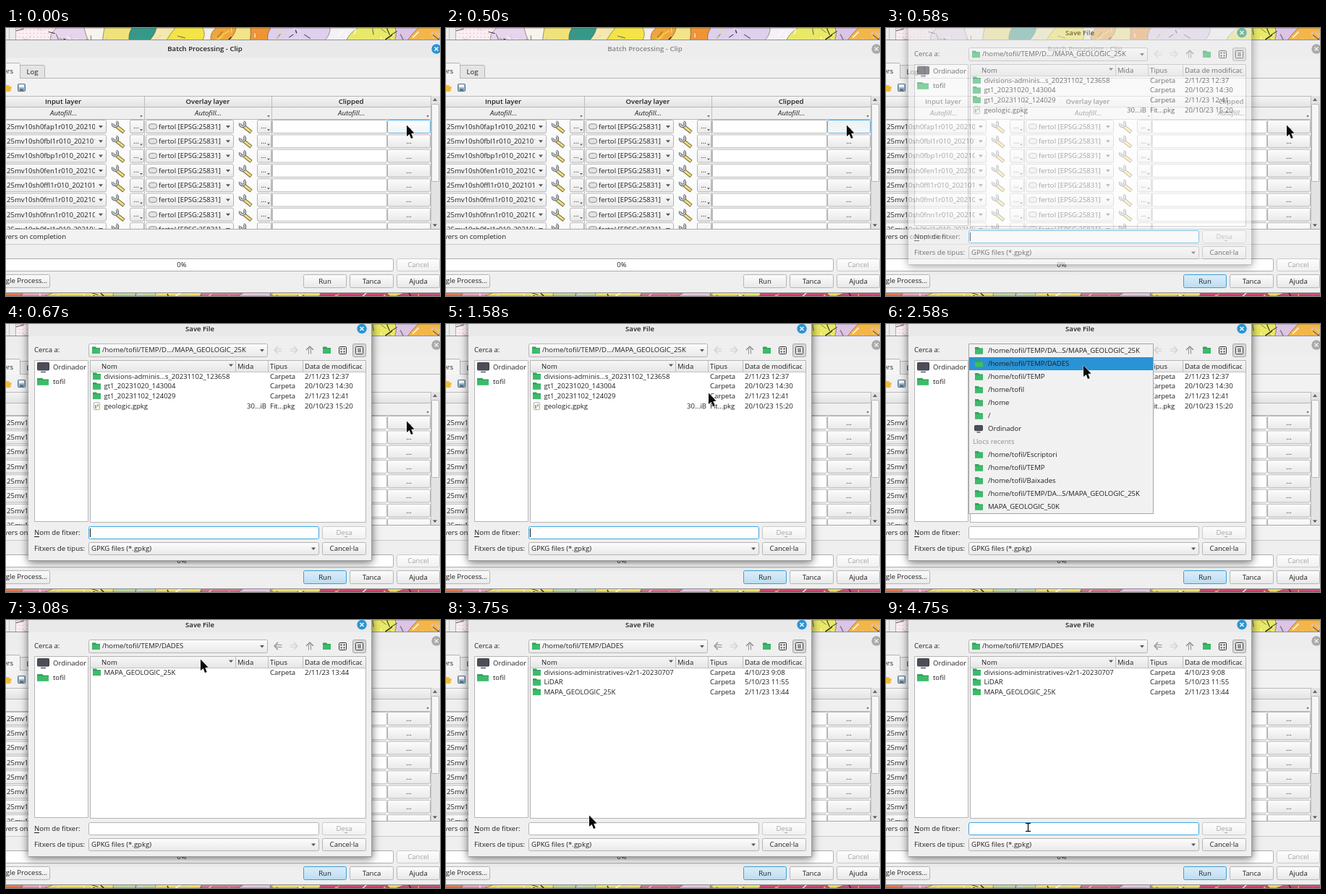
An HTML page with a canvas that plays this animation: 600 px wide and 371 px high, repeating every 5.01 s.

```html
<!DOCTYPE html>
<html lang="ca">
<head>
<meta charset="utf-8">
<title>Batch Processing - Clip</title>
<style>
html, body { margin: 0; width: 100%; height: 100%; overflow: hidden; }
canvas { display: block; }
</style>
</head>
<body>
<canvas id="stage" width="600" height="371"></canvas>
<script>
const LOOP = 5010;
const main = document.getElementById('stage').getContext('2d');
const layerCanvas = document.createElement('canvas');
layerCanvas.width = 600;
layerCanvas.height = 371;
const layer = layerCanvas.getContext('2d');
let g = main;

const INK = '#1f1f1f', BG = '#efefef', EDGE = '#b5b5b5', BLUE = '#2a93d5', GREEN = '#3dbb6b';
const HOME = '/home/tofil';

// ---- helpers ----
function text(s, x, cy, { align = 'left', color = INK, style = '' } = {}) {
  g.font = `${style} 9.55px "Open Sans", "Noto Sans", sans-serif`;
  g.textAlign = align;
  g.fillStyle = color;
  g.fillText(s, x, cy + 3.4);
}
function rect(x, y, w, h, fill) {
  g.fillStyle = fill;
  g.fillRect(x, y, w, h);
}
function box(x, y, w, h, fill, stroke = EDGE, r = 2) {
  g.beginPath();
  g.roundRect(x + .5, y + .5, w - 1, h - 1, r);
  g.fillStyle = fill;
  g.fill();
  g.strokeStyle = stroke;
  g.lineWidth = 1;
  g.stroke();
}
function shade(y, h, top, bottom) {
  const s = g.createLinearGradient(0, y, 0, y + h);
  s.addColorStop(0, top);
  s.addColorStop(1, bottom);
  return s;
}
function poly(points, fill) {
  g.beginPath();
  points.forEach(([x, y]) => g.lineTo(x, y));
  g.closePath();
  g.fillStyle = fill;
  g.fill();
}
function line(points, color, width = 1) {
  g.beginPath();
  points.forEach(([x, y]) => g.lineTo(x, y));
  g.strokeStyle = color;
  g.lineWidth = width;
  g.lineJoin = 'round';
  g.stroke();
}
function clipped(x, y, w, h, draw) {
  g.save();
  g.beginPath();
  g.rect(x, y, w, h);
  g.clip();
  draw();
  g.restore();
}
function triangle(x, y, color = '#555', size = 3) {
  poly([[x - size, y - size / 2], [x + size, y - size / 2], [x, y + size / 2 + .5]], color);
}
function button(x, y, w, h, label, { color = INK, top = '#fdfdfd', bottom = '#e8e8e8', edge = EDGE } = {}) {
  box(x, y, w, h, shade(y, h, top, bottom), edge);
  if (label) text(label, x + w / 2, y + h / 2, { align: 'center', color });
}
function combo(x, y, w, h) {
  button(x, y, w, h);
  triangle(x + w - 8, y + h / 2);
}
function closeDot(x, y, active) {
  g.beginPath();
  g.arc(x, y, 6.7, 0, 7);
  g.fillStyle = active ? BLUE : '#a9a9a9';
  g.fill();
  const c = active ? '#fff' : '#eee';
  line([[x - 2.5, y - 2.5], [x + 2.5, y + 2.5]], c, 1.4);
  line([[x + 2.5, y - 2.5], [x - 2.5, y + 2.5]], c, 1.4);
}
function folder(x, cy, w = 11) {
  poly([[x, cy - 5], [x + w * .45, cy - 5], [x + w * .55, cy - 3.5], [x + w, cy - 3.5], [x + w, cy + 4.5], [x, cy + 4.5]], '#2fa35a');
  rect(x, cy - 2.3, w, 6.8, GREEN);
}
function monitor(x, cy, w) {
  box(x, cy - w * .42, w, w * .68, '#4c4f57', '#3c3f46', 1);
  rect(x + w * .3, cy + w * .32, w * .4, 2, '#777b84');
}

// ---- map behind the windows ----
function map() {
  let seed = 11;
  const rnd = () => (seed = (seed * 16807) % 2147483647) / 2147483647;
  const strip = (y, h, bands, marks) => clipped(0, y, 600, h, () => {
    bands.forEach(([x, color]) => {
      const lean = rnd() * 26 - 16, bulge = rnd() * 16 - 8;
      g.beginPath();
      g.moveTo(600, y);
      g.lineTo(x, y);
      g.quadraticCurveTo(x + lean / 2 + bulge, y + h / 2, x + lean, y + h);
      g.lineTo(600, y + h);
      g.fillStyle = color;
      g.fill();
      g.strokeStyle = 'rgba(60,50,40,.6)';
      g.lineWidth = .8;
      g.stroke();
    });
    const inks = ['#222', '#777', '#fff', '#d9c3e6', '#f4e542'];
    for (let i = 0; i < marks; i++) {
      const x = 15 + rnd() * 585, top = y + rnd() * h;
      line([[x, top], [x + rnd() * 24 - 12, top + 2 + rnd() * 8]], inks[i % 5], .5 + rnd());
    }
  });
  strip(0, 18, [[14, '#fbeef3'], [70, '#e6d5ec'], [108, '#f7f4ee'], [136, '#efe27a'], [174, '#35998a'], [208, '#f3e9b0'],
    [234, '#f4e445'], [272, '#f5efe6'], [290, '#f0a53e'], [318, '#f3e48a'], [338, '#ee9434'], [366, '#ded0ee'],
    [448, '#f4f2f6'], [486, '#e8e968'], [538, '#dcc4e4'], [570, '#f2b64a']], 75);
  strip(365, 6, [[0, '#e8774e'], [28, '#eda0b5'], [66, '#f0e35f'], [150, '#b9d79a'], [205, '#efe06a'], [265, '#d9738c'],
    [330, '#e6c4de'], [375, '#efdf6c'], [430, '#d8436c'], [530, '#ecd75e'], [552, '#d24a70']], 40);
  rect(0, 0, 14, 17, '#ececec');
  line([[4.5, 0], [4.5, 17]], '#c4c4c4');
  line([[13.5, 0], [13.5, 17]], '#b0b0b0');
  for (let x = 18; x < 68; x += 5) for (let y = 2; y < 16; y += 5) rect(x, y, 1, 1, '#e39ab4');
}

// ---- batch window ----
function wrench(x, cy) {
  line([[x + 7, cy], [x + 17, cy + 8]], '#6d6440', 5);
  line([[x + 7, cy], [x + 16.5, cy + 7.5]], '#f0dc7c', 3);
  g.beginPath();
  g.arc(x + 5, cy - 3.5, 3.4, -1.1, 3.4);
  g.strokeStyle = '#5d6266';
  g.lineWidth = 3.6;
  g.stroke();
  g.strokeStyle = '#c9cdd0';
  g.lineWidth = 1.8;
  g.stroke();
}
function moreButton(x, y) {
  button(x, y, 20, 19, '');
  text('…', x + 9, y + 9, { align: 'center' });
  triangle(x + 16, y + 14, '#555', 1.8);
}
function tableRow(code, i, k) {
  const y = 127 + i * 20.3, cy = y + 9.3;
  rect(140, y, 30, 19, '#fbfbfb');
  rect(316, y, 30, 19, '#fbfbfb');
  combo(-5, y, 144, 19);
  clipped(0, y, 123, 20, () => text(`25mv10sh0${code}1r010_20210114`, 1, cy));
  wrench(146, cy);
  moreButton(171, y);
  combo(193, y, 122, 19);
  g.beginPath();
  g.roundRect(197.5, cy - 3.5, 11, 7, 3);
  g.fillStyle = '#e2e2e2';
  g.fill();
  g.strokeStyle = '#8a8a8a';
  g.lineWidth = 1;
  g.stroke();
  text('fertol [EPSG:25831]', 211, cy);
  wrench(322, cy);
  moreButton(347, y);
  box(368, y, 159, 19, '#fff', '#b9b9b9', 1);
  const lit = i === 0 && k < 7;
  const look = !lit ? {} : k < 4
    ? { top: '#ffffff', bottom: '#eef3f6', edge: '#55b5e8' }
    : { top: '#eef2f4', bottom: '#f4f6f7', edge: '#55b5e8' };
  button(527, y, 60, 19, '…', look);
}
function batchWindow(k) {
  const active = k < 6;
  rect(0, 16, 600, 351, '#8f8f8f');
  rect(0, 17, 600, 349, BG);
  rect(0, 17, 600, 24, active ? '#e9e9ea' : '#ededed');
  text('Batch Processing - Clip', 275, 29, { align: 'center', style: '600', color: active ? INK : '#858585' });
  closeDot(595, 29, active);

  box(19, 51, 35, 20, '#e4e4e4');
  text('Log', 28.5, 60.5);
  line([[19, 69.5], [600, 69.5]], EDGE);
  box(-6, 48, 26, 24, '#f5f5f5');
  rect(0, 70, 600, 229, '#f2f2f2');
  text('Parameters', 10, 60, { align: 'right' });
  line([[0, 299.5], [600, 299.5]], '#c9c9c9');

  poly([[0, 79], [4, 79], [5, 81], [8, 81], [6, 88], [0, 88]], '#f0bd3a');
  box(16, 77, 11, 11, '#a3b8c9', '#4f6f88', 1);
  rect(18, 78, 7, 4, '#f1f5f9');
  rect(19, 84, 5, 3, '#5d7c95');

  rect(0, 94, 588, 185, '#fafafa');
  rect(0, 94, 588, 15, shade(94, 15, '#f6f6f6', '#e3e3e3'));
  rect(0, 109, 588, 17, '#efefef');
  [['Input layer', 79, 191], ['Overlay layer', 279, 367], ['Clipped', 477, 587]].forEach(([name, x, edge]) => {
    text(name, x, 102, { align: 'center', style: '600' });
    text('Autofill…', x + .5, 118, { align: 'center', style: 'italic' });
    triangle(edge - 4, 122, '#666', 1.8);
    line([[edge + .5, 94], [edge + .5, 278]], '#bdbdbd');
  });
  [94.5, 109.5, 126.5].forEach(y => line([[0, y], [588, y]], '#b7b7b7'));
  clipped(0, 127, 588, 151, () =>
    ['fap', 'fbl', 'fbp', 'fen', 'ffl', 'fml', 'fnn', 'fel'].forEach((code, i) => tableRow(code, i, k)));
  line([[0, 278.5], [600, 278.5]], '#a9a9a9');

  rect(588, 94, 12, 184, '#e3e3e3');
  box(588, 105, 11, 108, '#f6f6f6', '#b5b5b5', 1);
  poly([[590, 101], [596, 101], [593, 97]], '#666');
  triangle(593, 273);

  text('Load layers on completion', 83, 289, { align: 'right' });
  box(-5, 319, 541, 18, '#fff', '#adadad');
  text('0%', 243, 328, { align: 'center' });
  button(540, 319, 60, 18, 'Cancel', { color: '#a5a5a5', bottom: '#f0f0f0', edge: '#cbcbcb' });
  button(-45, 341, 106, 19, '');
  text('Run as Single Process…', 57, 350, { align: 'right' });
  button(411, 341, 60, 19, 'Run', k < 7 ? {} : { top: '#dceefa', bottom: '#bcdcf0', edge: '#3e9fd6' });
  button(475, 341, 61, 19, 'Tanca');
  button(540, 341, 60, 19, 'Ajuda');
}

// ---- file dialog ----
const CARPETA = 'Carpeta';
const MAP25 = ['MAPA_GEOLOGIC_25K', '', CARPETA, '2/11/23 13:44'];
function filesAt(k) {
  if (k < 37) return [
    ['divisions-adminis…s_20231102_123658', '', CARPETA, '2/11/23 12:37'],
    ['gt1_20231020_143004', '', CARPETA, '20/10/23 14:30'],
    ['gt1_20231102_124029', '', CARPETA, '2/11/23 12:41'],
    ['geologic.gpkg', '30…iB', 'Fit…pkg', '20/10/23 15:20']];
  if (k < 38) return [MAP25];
  return [
    ['divisions-administratives-v2r1-20230707', '', CARPETA, '4/10/23 9:08'],
    ['LiDAR', '', CARPETA, '5/10/23 11:55'],
    MAP25];
}
function navArrow(x, cy, turn, color) {
  g.save();
  g.translate(x, cy);
  g.rotate(turn);
  line([[0, -5], [-5, 0], [0, 5]], color, 1.2);
  line([[5.5, -1.5], [-1.5, -1.5], [-3, 0], [-1.5, 1.5], [5.5, 1.5]], color, .9);
  g.restore();
}
function toolbar(k) {
  text('Cerca a:', 39, 36);
  combo(114, 27, 248, 19);
  folder(119, 36.5);
  text(k < 37 ? `${HOME}/TEMP/D…/MAPA_GEOLOGIC_25K` : `${HOME}/TEMP/DADES`, 133, 36);
  navArrow(376, 36, 0, k < 37 ? '#cdcdcd' : '#858585');
  navArrow(398, 36, Math.PI, '#cdcdcd');
  navArrow(420, 36, Math.PI / 2, '#858585');
  folder(438, 36.5);
  box(460, 31, 11, 11, '#f4f4f4', '#333', 1);
  [463, 467].forEach(x => [34, 38].forEach(y => rect(x - .5, y - .5, 2, 2, '#333')));
  box(479, 27, 19, 19, '#d6d6d6', '#a8a8a8');
  box(483, 31, 11, 11, '#f4f4f4', '#333', 1);
  [34, 36, 38].forEach(y => rect(486, y, 5, 1, '#333'));
}
function fileList(k) {
  box(39, 50, 75, 224, '#fff', EDGE, 0);
  monitor(43, 60, 17);
  text('Ordinador', 65, 60);
  folder(43, 80, 16);
  text('tofil', 65, 80);

  box(116, 50, 382, 225, '#fff', EDGE, 0);
  rect(117, 51, 380, 15, shade(51, 15, '#f7f7f7', '#e6e6e6'));
  line([[117, 66.5], [497, 66.5]], '#c4c4c4');
  [317.5, 362.5, 410.5].forEach(x => line([[x, 51], [x, 66]], '#bdbdbd'));
  text('Nom', 132, 58.5);
  triangle(311, 57);
  text('Mida', 320, 58.5);
  text('Tipus', 365, 58.5);
  clipped(411, 50, 81, 17, () => text('Data de modificació', 413, 58.5));
  filesAt(k).forEach(([name, size, type, date], i) => {
    const cy = 72.5 + i * 13.55;
    if (size) {
      box(121, cy - 5, 9, 11, '#fafafa', '#aaa', 1);
      rect(123, cy - 1, 2, 5, '#85b36d');
      rect(126, cy - 2, 2, 3, '#c3a55e');
    } else folder(120, cy);
    text(name, 135.5, cy);
    text(size, 360, cy, { align: 'right' });
    text(type, 365, cy);
    text(date, 413, cy);
  });
}
function nameForm(k) {
  const focused = k < 26 || k >= 50;
  const caret = k < 12 || (k >= 18 && k < 24) || (k >= 51 && k < 57);
  text('Nom de fitxer:', 39, 289);
  line([[39, 294.5], [46, 294.5]], INK);
  box(114, 280, 319, 18, '#fff', focused ? '#3da5df' : EDGE);
  if (focused && caret) rect(116, 283, 1, 12, '#111');
  button(437, 280, 61, 18, 'Desa', { color: '#a5a5a5', bottom: '#f0f0f0', edge: '#cbcbcb' });
  line([[468, 294.5], [472, 294.5]], '#a5a5a5');
  text('Fitxers de tipus:', 39, 311);
  combo(114, 302, 319, 18);
  text('GPKG files (*.gpkg)', 118, 311);
  button(437, 302, 61, 18, 'Cancel·la');
}
function placesPopup(k) {
  const deep = `${HOME}/TEMP/DA…S/MAPA_GEOLOGIC_25K`;
  const places = [deep, `${HOME}/TEMP/DADES`, `${HOME}/TEMP`, HOME, '/home', '/', 'Ordinador', 'Llocs recents',
    `${HOME}/Escriptori`, `${HOME}/TEMP`, `${HOME}/Baixades`, deep, 'MAPA_GEOLOGIC_50K'];
  const picked = pointer(k)[1] > 45 ? 1 : 0;
  box(114, 27, 256, 236, '#f1f1f1', '#a5a5a5', 0);
  rect(115, 28 + picked * 18, 254, 18, BLUE);
  places.forEach((place, i) => {
    const cy = 37 + i * 18;
    if (i === 7) return text(place, 120, cy, { color: '#8e8e8e' });
    if (i === 6) monitor(122, cy, 12);
    else folder(123, cy);
    text(place, 141, cy);
  });
}
function fileDialog(k) {
  g.save();
  g.shadowColor = 'rgba(0,0,0,.6)';
  g.shadowBlur = 11;
  g.shadowOffsetY = 2;
  rect(31, -6, 475, 334, '#9b9b9b');
  g.restore();
  rect(31, 0, 474, 327, BG);
  rect(31, 0, 474, 17, '#e9e9ea');
  text('Save File', 268, 7, { align: 'center', style: '600' });
  closeDot(492, 6.5, true);
  toolbar(k);
  fileList(k);
  nameForm(k);
  if (k >= 26 && k < 37) placesPopup(k);
}

// ---- pointer ----
const PATH = [[13, 554, 134], [19, 363, 95], [20, 333, 79], [24, 290, 29], [26, 289, 27],
  [31, 273, 57], [33, 273, 57], [34, 268, 57], [36, 268, 57], [37, 269, 54], [43, 203, 235], [46, 196, 287]];
function pointer(k) {
  const i = PATH.findIndex(p => p[0] >= k);
  if (i < 0) return PATH[PATH.length - 1].slice(1);
  if (i === 0) return PATH[0].slice(1);
  const [k0, x0, y0] = PATH[i - 1], [k1, x1, y1] = PATH[i];
  const f = (k - k0) / (k1 - k0);
  return [Math.round(x0 + (x1 - x0) * f), Math.round(y0 + (y1 - y0) * f)];
}
function drawPointer(k) {
  const [x, y] = pointer(k);
  if (k >= 46) {
    const beam = [[[x - 3, y - 5.5], [x + 4, y - 5.5]], [[x + .5, y - 5], [x + .5, y + 5]], [[x - 3, y + 5.5], [x + 4, y + 5.5]]];
    beam.forEach(s => line(s, '#111', 1.3));
    return;
  }
  const arrow = [[0, 0], [0, 15.5], [3.7, 12.6], [6, 18.5], [8.7, 17.5], [6.3, 11.6], [10.5, 11]].map(([dx, dy]) => [x + dx, y + dy + .5]);
  line([...arrow, arrow[0]], 'rgba(255,255,255,.6)', 1.2);
  poly(arrow, '#0a0a0a');
}

// ---- playback: twelve poses per second ----
function draw(k) {
  g = main;
  map();
  batchWindow(k);
  if (k >= 7) {
    g = layer;
    g.clearRect(0, 0, 600, 371);
    fileDialog(k);
    g = main;
    g.globalAlpha = k === 7 ? .6 : 1;
    g.drawImage(layerCanvas, 0, 0);
    g.globalAlpha = 1;
  }
  drawPointer(k);
}
let shown = -1;
function tick() {
  const k = Math.floor((performance.now() % LOOP + 3.4) * 12 / 1000);
  if (k !== shown) draw(shown = k);
  requestAnimationFrame(tick);
}
tick();
</script>
</body>
</html>
```
